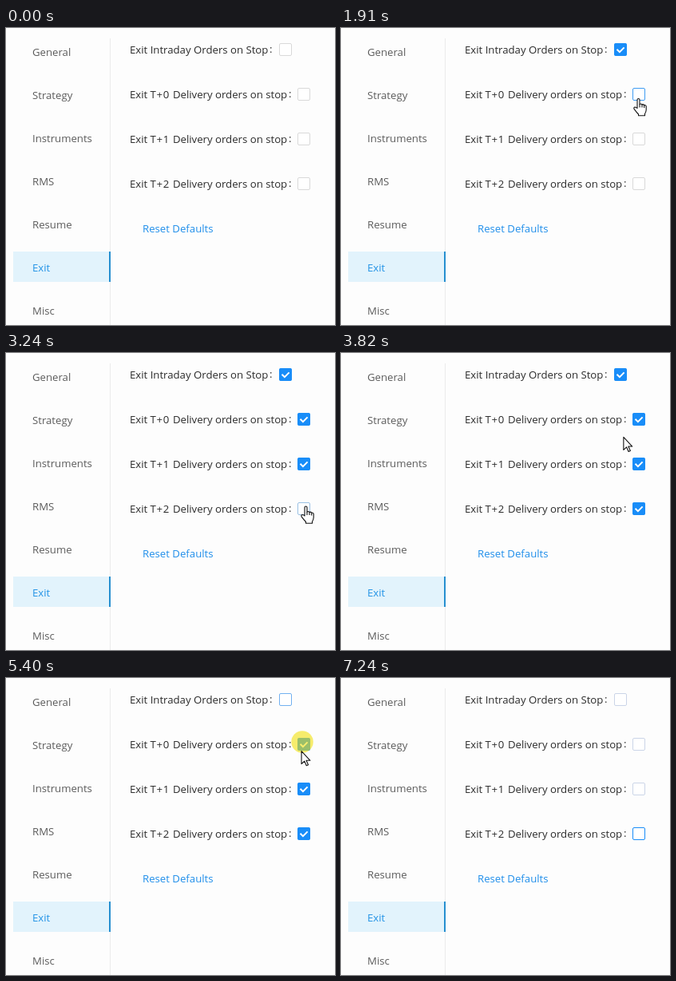
An HTML page with a canvas for the animation above (7660 ms loop, 412 by 372 pixels).

```html
<!DOCTYPE html>
<html lang="en">
<head>
<meta charset="utf-8">
<title>Exit settings</title>
<style>
  html, body { margin: 0; width: 412px; height: 372px; overflow: hidden; background: #fdfdfd; }
  svg, canvas { position: absolute; left: 0; top: 0; }
  text { font: 13.2px "Open Sans", "Noto Sans", sans-serif; white-space: pre; }
</style>
</head>
<body>
<svg id="page" width="412" height="372">
  <rect x="130" y="13" width="1" height="359" fill="#ebebeb"/>
  <rect x="9" y="280" width="122" height="38" fill="#e2f3fc"/>
  <rect x="129" y="280" width="2" height="38" fill="#268fd0"/>
</svg>
<canvas id="stage" width="412" height="372"></canvas>
<script>
const LOOP = 7660;
const ROWS = 4;
const WHITE = [255, 255, 255], BLUE = [25, 141, 248], GREY = [217, 217, 217], PALE = [203, 213, 232];
const page = document.getElementById('page');
const ctx = document.getElementById('stage').getContext('2d');

function label(str, x, y, fill, spacing = 0) {
  const el = document.createElementNS('http://www.w3.org/2000/svg', 'text');
  el.setAttribute('x', x);
  el.setAttribute('y', y);
  el.setAttribute('fill', fill);
  el.style.letterSpacing = spacing + 'px';
  el.textContent = str;
  page.appendChild(el);
}

['General', 'Strategy', 'Instruments', 'RMS', 'Resume', 'Exit', 'Misc'].forEach((name, i) =>
  label(name, 33, 35 + 54 * i, name === 'Exit' ? '#2494e6' : '#5c5c5c'));

const INK = '#2b2b2b';
label('Exit Intraday Orders on Stop', 155, 32, INK);
label(':', 330, 31, INK);
for (let i = 0; i < 3; i++) {
  const y = 88 + 56 * i;
  label('Exit', 155, y, INK);
  label('T+' + i, 180.5, y, INK, 0.7);
  label('Delivery orders on stop', 208.9, y, INK);
  label(':', 354, y - 1, INK);
}
label('Reset Defaults', 171, 256, '#1f8eea');

const boxes = Array.from({ length: ROWS }, (_, i) => ({ x: i ? 365 : 342, y: 19 + 56 * i }));

// The pointer works down the rows twice: [arrive, click, offset in the box]
const stops = [
  [850, 910, 8, 15], [1870, 1990, 6.5, 12.5], [2440, 2600, 5, 12], [3230, 3290, 9.5, 4],
  [4300, 4640, 8, 12], [5070, 5270, 6, 5], [5760, 5910, 7, 12], [6370, 6670, 1, 9]
].map(([arrive, click, dx, dy], i) => {
  const row = i % ROWS;
  return { row, arrive, click, x: boxes[row].x + dx, y: boxes[row].y + dy };
});
const route = [{ click: 100, x: 356, y: 378 }, ...stops, { arrive: 7240, x: 354, y: 380 }];

const LAG = 130;
const clamp = v => Math.max(0, Math.min(1, v));
const smooth = u => u * u * (3 - 2 * u);

// Leaves each stop on the click and bows left on the way to the next
function pointer(t) {
  const i = Math.max(1, route.findIndex(s => !(s.click <= t)));
  const a = route[i - 1], b = route[i];
  const u = smooth(clamp((t - a.click) / (b.arrive - a.click)));
  const bow = 0.05 * Math.abs(b.y - a.y) * Math.sin(Math.PI * u);
  return { x: a.x + (b.x - a.x) * u - bow, y: a.y + (b.y - a.y) * u };
}

function inside(p, b) {
  return p.x >= b.x && p.x < b.x + 16 && p.y >= b.y && p.y < b.y + 16;
}

function lit(t, row) {
  const last = stops.filter(s => s.click <= t).pop();
  if (last && last.row === row) return 1;
  return inside(pointer(t), boxes[row]) ? 0.8 : 0;
}

// Border fade: average over the last 300 ms
function glow(t, row) {
  let sum = 0;
  for (let k = 0; k < 12; k++) sum += lit(t - k * 25, row);
  return sum / 12;
}

function mix(a, b, u) {
  return `rgb(${a.map((v, i) => Math.round(v + (b[i] - v) * u))})`;
}

function frameBox(x, y, grow, color) {
  ctx.strokeStyle = color;
  ctx.lineWidth = 1;
  ctx.beginPath();
  ctx.roundRect(x + 0.5 - grow, y + 0.5 - grow, 15 + 2 * grow, 15 + 2 * grow, 1.5);
  ctx.stroke();
}

function drawTick(x, y, size) {
  ctx.save();
  ctx.translate(x, y);
  ctx.scale(size, size);
  ctx.strokeStyle = '#fff';
  ctx.lineWidth = 2;
  ctx.beginPath();
  ctx.moveTo(-4.5, -0.2);
  ctx.lineTo(-1.1, 3.1);
  ctx.lineTo(4.6, -2.6);
  ctx.stroke();
  ctx.restore();
}

function drawBox(row, t) {
  const { x, y } = boxes[row];
  const on = stops[row].click + LAG, off = stops[row + ROWS].click + LAG;
  const fill = clamp((t - on) / 180) * (1 - clamp((t - off) / 180));

  const pulse = (t - on) / 360;
  if (pulse > 0 && pulse < 1) {
    ctx.globalAlpha = 0.5 * (1 - pulse);
    frameBox(x, y, 4.8 * (1 - (1 - pulse) ** 2), mix(BLUE, BLUE, 0));
    ctx.globalAlpha = 1;
  }

  ctx.fillStyle = mix(WHITE, BLUE, fill);
  ctx.fillRect(x + 0.5, y + 0.5, 15, 15);
  frameBox(x, y, 0, mix(t < on ? GREY : PALE, BLUE, Math.max(fill, glow(t, row))));
  if (fill > 0) drawTick(x + 8, y + 8, fill);
}

function drawRipple(t) {
  for (const s of stops) {
    const u = (t - s.click) / 350;
    if (u < 0 || u >= 1) continue;
    ctx.fillStyle = `rgba(242,224,10,${0.95 * (1 - u)})`;
    ctx.beginPath();
    ctx.arc(s.x, s.y, 4 + 26 * u, 0, Math.PI * 2);
    ctx.fill();
  }
}

const arrow = new Path2D('M.5 .5V16.5L4.2 13L6.7 18.6L9 17.6L6.5 12.2H11.4Z');
const hand = new Path2D('M5 13V2.5Q5 1 6.5 1Q8 1 8 2.5V8Q9.6 6.9 11 8.4Q12.5 7.6 13.7 9.2' +
  'Q15.4 8.6 16.2 10.5V15Q16 18 14.5 20V22.3H6.5V20.5Q4.5 18.5 1 13.8Q.4 12 2 11.5Q3.5 11.5 5 13Z');
const knuckles = new Path2D('M8 8V12M11 8.4V12M13.7 9.2V12.4');

function drawPointer(t) {
  const p = pointer(t);
  const over = boxes.some(b => inside(p, b));
  const shape = over ? hand : arrow;
  ctx.save();
  ctx.translate(p.x - (over ? 5.5 : 0), p.y);
  ctx.fillStyle = '#fff';
  ctx.strokeStyle = '#111';
  ctx.lineWidth = 1.1;
  ctx.lineJoin = 'round';
  ctx.fill(shape);
  ctx.stroke(shape);
  if (over) ctx.stroke(knuckles);
  ctx.restore();
}

function draw(t) {
  ctx.clearRect(0, 0, 412, 372);
  boxes.forEach((b, row) => drawBox(row, t));
  drawRipple(t);
  drawPointer(t);
}

const began = performance.now();
function frame() {
  draw((performance.now() - began) % LOOP);
  requestAnimationFrame(frame);
}
frame();
</script>
</body>
</html>
```
